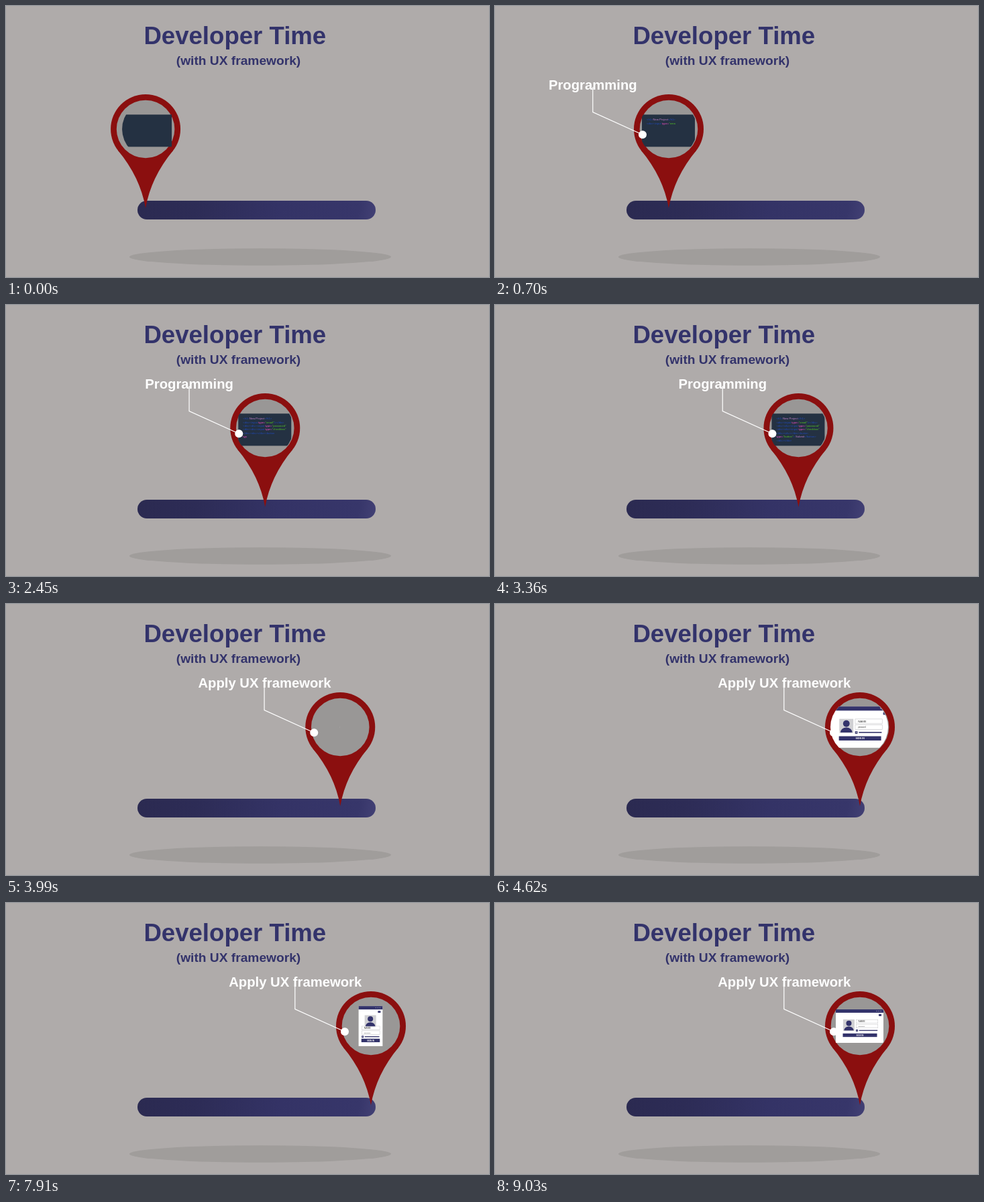
These frames come from a looping animation (720x405 px, 9450 ms). An HTML page with a canvas:

```html
<!DOCTYPE html>
<html lang="en">
<head>
<meta charset="utf-8">
<title>Developer Time</title>
<style>
  html, body { margin: 0; width: 100%; height: 100%; overflow: hidden; background: #afabaa; }
  canvas { display: block; width: 720px; height: 405px; }
</style>
</head>
<body>
<canvas id="stage"></canvas>
<script>
const LOOP = 9450, ARRIVE = 4620, LABEL_IN = 630, SWITCH = 3990;
const NAVY = '#33336b', RED = '#8b0f0f', PANEL = '#243142';
const SANS = '"Liberation Sans", Arial, sans-serif';

const canvas = document.getElementById('stage');
const ctx = canvas.getContext('2d');
const ratio = window.devicePixelRatio || 1;
canvas.width = 720 * ratio;
canvas.height = 405 * ratio;

const CODE = [
  '<h1>New Project</h1>',
  '<div><input type="email"/></div>',
  '<div><div><input type="password"',
  '<div><div><input type="checkbox"',
  '</div><div></div><button',
  'type="button"> Submit</button>',
  '</div></div>'
];
const TOKENS = /(type=|"[^"]*"|New Project|Submit)/;
const TYPED = [[70, 0], [1330, 82], [2450, 143], [3300, 190]];
const MASK_SHIFT = [[0, 8], [420, -1]];

const lerp = (a, b, p) => a + (b - a) * p;

function sample(table, t) {
  if (t <= table[0][0]) return table[0][1];
  for (let i = 1; i < table.length; i++) {
    const [t0, v0] = table[i - 1], [t1, v1] = table[i];
    if (t < t1) return lerp(v0, v1, (t - t0) / (t1 - t0));
  }
  return table[table.length - 1][1];
}

// Damped spring from 0 to 1; ms since release, decay and swing per second.
function spring(ms, decay, swing) {
  if (ms <= 0) return 0;
  const s = ms / 1000;
  return 1 - Math.exp(-decay * s) * (Math.cos(swing * s) + decay / swing * Math.sin(swing * s));
}

function box(x0, y0, x1, y1, color) {
  ctx.fillStyle = color;
  ctx.fillRect(x0, y0, x1 - x0, y1 - y0);
}

function disc(x, y, r, color) {
  ctx.fillStyle = color;
  ctx.beginPath();
  ctx.arc(x, y, r, 0, 2 * Math.PI);
  ctx.fill();
}

function write(text, x, y, size, color, weight = 'bold', align = 'left') {
  ctx.font = `${weight} ${size}px ${SANS}`;
  ctx.textAlign = align;
  ctx.fillStyle = color;
  ctx.fillText(text, x, y);
}

function drawBackdrop() {
  box(0, 0, 720, 405, '#afabaa');
  write('Developer Time', 341.3, 56.5, 36.6, NAVY, 'bold', 'center');
  write('(with UX framework)', 346.5, 87.5, 19.2, NAVY, 'bold', 'center');

  ctx.fillStyle = '#a09d9b';
  ctx.beginPath();
  ctx.ellipse(379, 375, 195, 12.8, 0, 0, 2 * Math.PI);
  ctx.fill();

  const shade = ctx.createLinearGradient(196, 280, 551, 330);
  shade.addColorStop(0, '#2b2a51');
  shade.addColorStop(0.25, '#2d2c56');
  shade.addColorStop(0.6, '#343366');
  shade.addColorStop(0.92, '#37366a');
  shade.addColorStop(1, '#434175');
  ctx.fillStyle = shade;
  ctx.beginPath();
  ctx.roundRect(196, 291, 355, 28, 14);
  ctx.fill();
}

function drawPin() {
  disc(0, 184, 52, RED);
  ctx.beginPath();
  ctx.moveTo(-41, 216);
  ctx.quadraticCurveTo(-8, 256, 0, 302);
  ctx.quadraticCurveTo(8, 256, 41, 216);
  ctx.fill();
  disc(0, 184, 43.3, '#999796');
}

function tokenColor(token) {
  if (token === 'type=') return '#f04fc4';
  if (token[0] === '"') return '#55c425';
  return /^(New|Submit)/.test(token) ? '#c583cf' : '#2149b8';
}

function drawCode(t) {
  box(-40, 162.3, 39, 210.4, PANEL);
  let left = Math.floor(sample(TYPED, t));
  CODE.forEach((line, row) => {
    let x = -33;
    for (const token of line.split(TOKENS)) {
      const part = token.slice(0, Math.max(0, left));
      left -= token.length;
      if (!part) continue;
      write(part, x, 171.2 + row * 5.4, 4.2, tokenColor(token), 'normal');
      x += ctx.measureText(part).width;
    }
  });
}

function drawField(x0, x1, y, text, size) {
  box(x0, y, x1, y + 6, '#b9b9bd');
  box(x0 + 0.4, y + 0.4, x1 - 0.4, y + 5.6, '#fff');
  write(text, x0 + 3.6, y + 3 + size * 0.36, size, '#333', 'normal');
}

function drawAvatar(x, y) {
  box(x - 8.5, y - 8.5, x + 8.5, y + 8.5, '#d0d0d3');
  disc(x, y - 2.8, 4, NAVY);
  ctx.beginPath();
  ctx.ellipse(x, y + 8, 7.2, 6, 0, Math.PI, 2 * Math.PI);
  ctx.fill();
}

// The form reflows from a wide window (p = 0) to a narrow one (p = 1).
function drawForm(t) {
  const p = spring(t - 5790, 5.9, 8.35) - spring(t - 7890, 5.9, 8.35);
  const scale = t < 5670 ? spring(t - SWITCH + 20, 2.35, 5.2) : 1;
  const at = (wide, narrow) => lerp(wide, narrow, p);
  const half = at(35.5, 17.5), top = at(-25, -30);
  const start = at(-5.5, -13.5), end = at(27.5, 13.5);
  const buttonX = at(-25, -13.5), buttonEnd = at(26, 13.5), buttonY = at(11, 19);
  const checkY = at(5, 14.5);

  ctx.save();
  ctx.translate(-0.5, 184);
  ctx.scale(scale, scale);
  box(-half, top, half, -top, '#fff');
  box(-half, top, half, top + 5, NAVY);
  for (const gap of [4, 7, 10]) disc(half - gap, top + 2.5, 0.7, '#9696b4');
  box(half - 7, top + 7, half - 3, top + 10, NAVY);
  box(half - 7, top + 8.4, half - 3, top + 8.7, '#8888a8');

  drawField(start, end, at(-10, 0), 'NAME', 3.5);
  drawField(start, end, at(-3, 7), 'password', 2.2);
  drawAvatar(at(-16, 0), at(-1.5, -8));
  box(start, checkY, start + 3, checkY + 3, NAVY);
  box(start + 1, checkY + 0.8, start + 2, checkY + 1.8, '#fff');
  box(start + 4.6, checkY + 0.8, end - 0.8, checkY + 2.1, NAVY);
  box(buttonX, buttonY, buttonEnd, buttonY + 5.2, NAVY);
  write('SIGN IN', (buttonX + buttonEnd) / 2, buttonY + 3.7, 2.9, '#fff', 'bold', 'center');
  ctx.restore();
}

function drawCallout(text, x) {
  write(text, x, 124.5, 20.25, '#fff');
  ctx.strokeStyle = '#fff';
  ctx.lineWidth = 1.2;
  ctx.beginPath();
  ctx.moveTo(-113.2, 121);
  ctx.lineTo(-113.2, 158.5);
  ctx.lineTo(-39, 192.3);
  ctx.stroke();
  disc(-39, 192.3, 6, '#fff');
}

function draw(t) {
  ctx.setTransform(ratio, 0, 0, ratio, 0, 0);
  drawBackdrop();
  ctx.translate(208 + 336 * Math.min(1, t / ARRIVE), 0);
  drawPin();

  ctx.save();
  ctx.beginPath();
  ctx.arc(sample(MASK_SHIFT, t), 184, 43, 0, 2 * Math.PI);
  ctx.clip();
  if (t < SWITCH) drawCode(t);
  else drawForm(t);
  ctx.restore();

  if (t >= SWITCH) drawCallout('Apply UX framework', -211.8);
  else if (t >= LABEL_IN) drawCallout('Programming', -179);
}

const begin = performance.now();
function tick() {
  draw((performance.now() - begin) % LOOP);
  requestAnimationFrame(tick);
}
tick();
</script>
</body>
</html>
```
